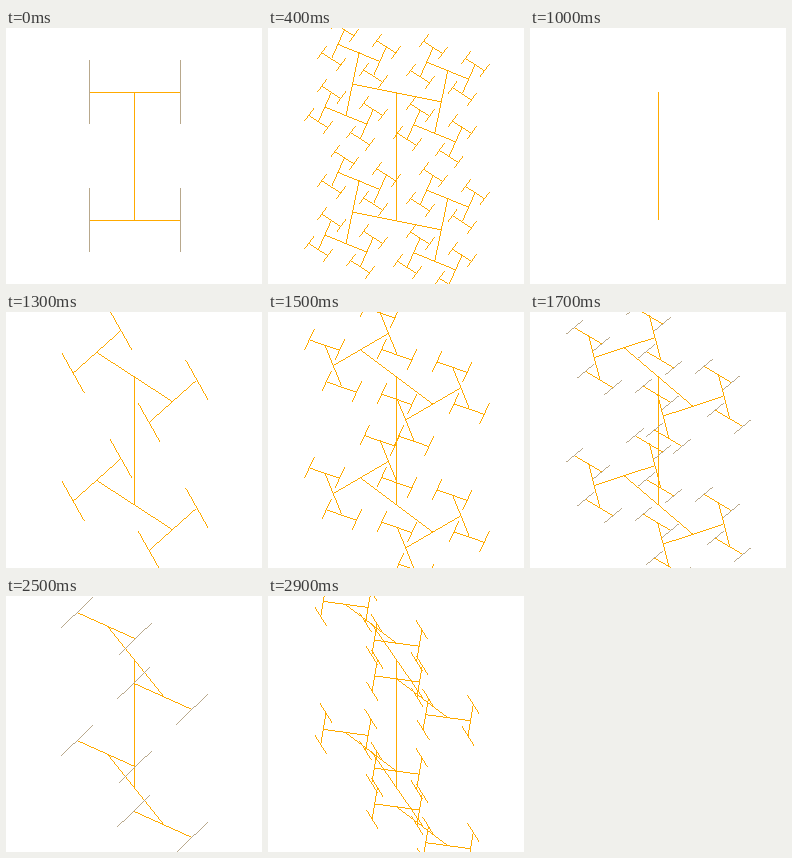
Recreate the animation shown at these times as an HTML page with a canvas. Size 256 by 256 pixels, loop 3 s.

```html
<!DOCTYPE html>
<html>
<head>
<meta charset="utf-8">
<style>
html, body { margin: 0; height: 100%; overflow: hidden; background: #fff; }
canvas { display: block; }
</style>
</head>
<body>
<canvas id="stage" width="256" height="256"></canvas>
<script>
const ctx = document.getElementById('stage').getContext('2d');
const STEP = 100, STEPS = 30, MAX_DEPTH = 6;
const ORANGE = '#fa0', GREY = '#b8a88c';

const snap = v => Math.ceil(v - 1e-6);

// Crisp one-pixel line: one pixel per whole coordinate along the longer axis.
function line(x, y, ax, ay) {
  const flat = Math.abs(ax) >= Math.abs(ay);
  const [mid, reach, base, slope] = flat ? [x, Math.abs(ax), y, ay / ax] : [y, Math.abs(ay), x, ax / ay];
  for (let p = snap(mid - reach); p < mid + reach; p++) {
    const q = snap(base + (p - mid) * slope);
    if (flat) ctx.fillRect(p, q, 1, 1);
    else ctx.fillRect(q, p, 1, 1);
  }
}

// Each branch is centred on an end of its parent: perpendicular to it, then sheared.
function branch(x, y, dx, dy, half, level, shear, leafColor) {
  const ax = dx * half, ay = dy * half;
  ctx.fillStyle = level ? ORANGE : leafColor;
  line(x, y, ax, ay);
  if (!level) return;
  const px = -dy, py = dx - shear * dy, len = Math.hypot(px, py);
  for (const side of [-1, 1]) {
    branch(x + side * ax, y + side * ay, px / len, py / len,
           half * Math.SQRT1_2, level - 1, shear, leafColor);
  }
}

function draw(step) {
  // Depth swings between 0 and its maximum; the leaf colour swaps at each peak.
  const depth = MAX_DEPTH - Math.abs((step + 2) % 12 - MAX_DEPTH);
  const leafColor = Math.floor((step + 8) / 12) % 2 ? ORANGE : GREY;
  ctx.fillStyle = '#fff';
  ctx.fillRect(0, 0, 256, 256);
  branch(128, 128, 0, -1, 64, depth, step * 0.05, leafColor);
}

function tick() {
  draw(Math.floor(performance.now() / STEP) % STEPS);
  requestAnimationFrame(tick);
}
tick();
</script>
</body>
</html>
```
